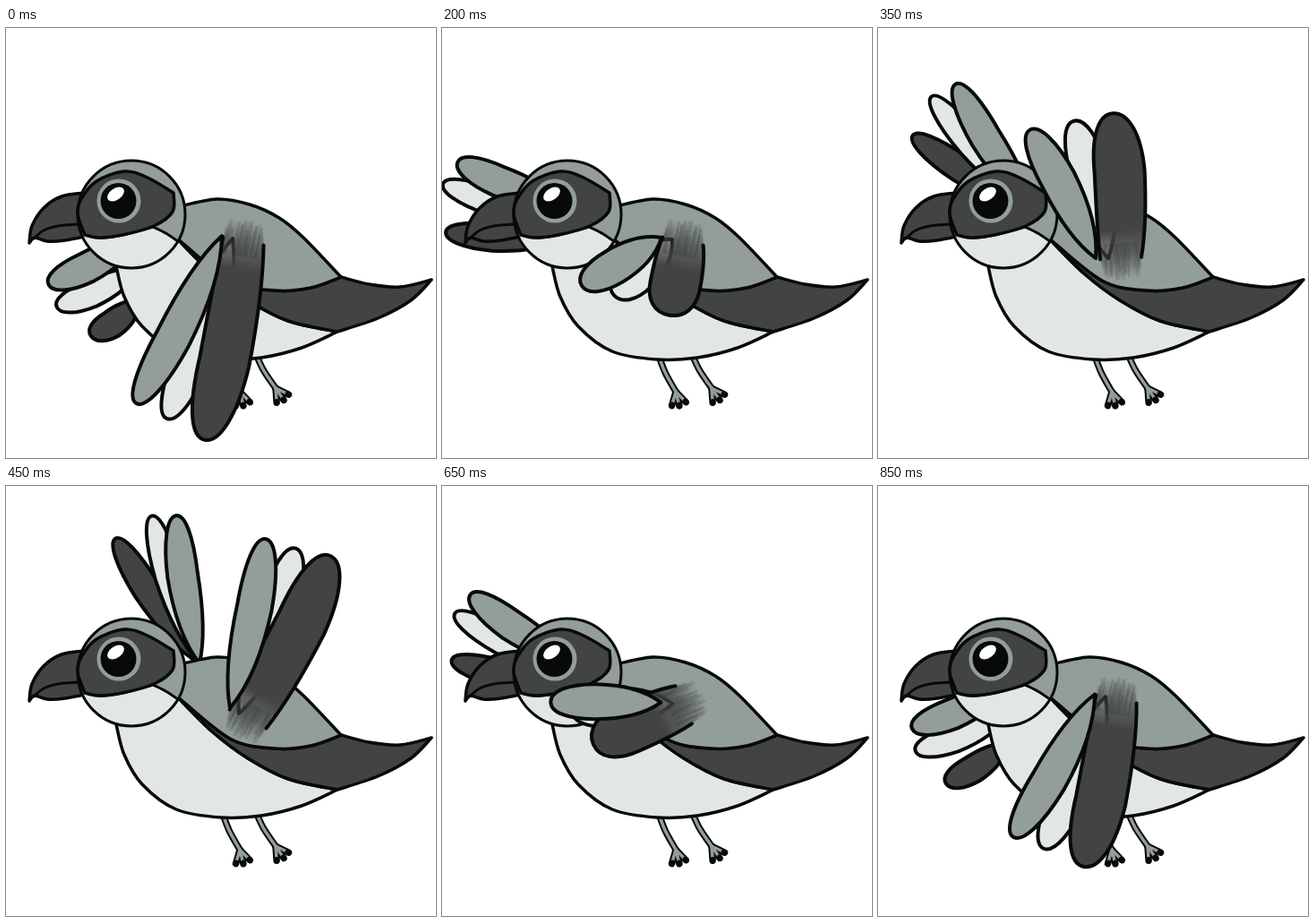
Write an HTML page with a canvas that moves like this. It is 480 by 480 pixels and loops after 900 ms.

```html
<!DOCTYPE html>
<html lang="en">
<head>
<meta charset="utf-8">
<title>Flapping bird</title>
<style>
html, body { margin: 0; width: 100%; height: 100%; overflow: hidden; background: #fff; }
canvas { display: block; width: 480px; height: 480px; }
</style>
</head>
<body>
<canvas id="stage" width="480" height="480"></canvas>
<script>
const ctx = document.getElementById('stage').getContext('2d');
const INK = '#070a09', GRAY = '#929d9c', DARK = '#424343', PALE = '#e2e7e6';
const STEP = 50, STEPS = 18, TOP = STEPS / 2;

// A wing swings through four poses: low, folded, raised, high.
const POSES = [0, 4, 7, TOP];

// root: first feather's x, y and the offset to the next feather's root.
// Each feather turns (degrees) and stretches (length) about its root.
const farWing = {
  root: [[150, 232, 0, 36], [135, 195, 0, 20], [176, 206, 0, 0], [216, 198, 0, 0]],
  bend: () => 0.2,
  feathers: [
    { fill: GRAY, half: 17, turn: [152, 201, 238, 261], length: [116, 126, 169, 167] },
    { fill: PALE, half: 15, turn: [155, 197, 228, 252], length: [103, 140, 174, 173] },
    { fill: DARK, half: 15, turn: [144, 183, 212, 236], length: [68, 131, 162, 168] }
  ],
  order: [2, 1, 0]
};
const nearWing = {
  root: [[241, 232, 12, 3], [245, 234, 12, 2], [243, 257, 14, 0], [250, 248, 10, 6]],
  bend: pose => 0.18 * Math.cos(Math.PI * pose / TOP),
  feathers: [
    { fill: GRAY, half: 19.5, turn: [117, 149, 243, 282], length: [210, 104, 161, 193] },
    { fill: PALE, half: 21, turn: [110, 136, 256, 289], length: [214, 90, 158, 195] },
    { fill: DARK, half: 28, turn: [101, 101, 267, 297], length: [226, 84, 162, 204], open: 23 }
  ],
  order: [1, 2, 0]
};

const BACK_TOP = [[190, 200], [235, 191], [272, 197], [305, 212], [332, 234], [374, 278]];
const BACK_LOW = [[374, 278], [340, 290], [300, 293], [250, 282], [190, 234]];
const TAIL_TOP = [[374, 278], [405, 286], [440, 289], [475, 281]];
const TAIL_LOW = [[475, 281], [452, 304], [415, 324], [370, 339]];
const STRIPE = [[370, 339], [315, 327], [270, 304], [230, 274], [190, 234]];
const BELLY = [[370, 339], [330, 357], [285, 368], [240, 370], [190, 361], [152, 333], [132, 300], [123, 266]];
const MASK_TOP = [[88, 231], [80, 208], [84, 191], [101, 171], [132, 160], [158, 167], [187, 184]];
const MASK_LOW = [[187, 184], [186, 205], [165, 221], [130, 231], [104, 234], [88, 231]];

const back = run => run.slice().reverse();
const mix = (a, b, t) => a + (b - a) * t;

// Smooth curves through points; corners only where two runs meet.
function trace(...runs) {
  ctx.beginPath();
  runs.forEach((r, k) => {
    ctx[k ? 'lineTo' : 'moveTo'](...r[0]);
    for (let i = 0; i < r.length - 1; i++) {
      const a = r[i - 1] || r[i], b = r[i], c = r[i + 1], d = r[i + 2] || c;
      ctx.bezierCurveTo(b[0] + (c[0] - a[0]) / 6, b[1] + (c[1] - a[1]) / 6,
        c[0] - (d[0] - b[0]) / 6, c[1] - (d[1] - b[1]) / 6, c[0], c[1]);
    }
  });
}

function paint(fill, width = 3.5) {
  if (fill) { ctx.fillStyle = fill; ctx.fill(); }
  if (width) { ctx.strokeStyle = INK; ctx.lineWidth = width; ctx.stroke(); }
}

function oval(x, y, rx, ry, turn, fill, width) {
  ctx.beginPath();
  ctx.ellipse(x, y, rx, ry, turn, 0, Math.PI * 2);
  paint(fill, width);
}

function random(seed) {
  return () => (seed = (seed * 16807) % 2147483647) / 2147483647;
}

// Local axes: u runs from root to tip in pixels, v across.
function feather(x, y, angle, len, half, bend, fill, open) {
  const base = open || 0, near = mix(base, half, 0.7);
  ctx.save();
  ctx.translate(x, y);
  ctx.rotate(angle * Math.PI / 180);
  const at = (t, v) => [t * len, v - bend * half * 4 * t * (1 - t)];
  const curve = (...p) => ctx.bezierCurveTo(...p.flatMap(q => at(...q)));
  const outline = () => {
    ctx.beginPath();
    ctx.moveTo(0, -base);
    curve([0.15, -near], [0.35, -half], [0.6, -half]);
    curve([0.85, -half], [1, -half * 0.6], [1, 0]);
    curve([1, half * 0.6], [0.85, half], [0.6, half]);
    curve([0.35, half], [0.15, near], [0, base]);
  };
  outline();
  if (open) {
    ctx.lineTo(-22, base * 0.8);
    ctx.lineTo(-22, -base * 0.8);
    paint(shoulderFade(fill), 0);
    hairs(base);
    outline();
    paint(null, 4);
  } else {
    ctx.closePath();
    paint(fill, 4);
  }
  ctx.restore();
}

function shoulderFade(fill) {
  const fade = ctx.createLinearGradient(-22, 0, 32, 0);
  fade.addColorStop(0, fill + '00');
  fade.addColorStop(0.5, fill + '99');
  fade.addColorStop(1, fill);
  return fade;
}

function hairs(spread) {
  const rnd = random(71);
  ctx.strokeStyle = DARK + '24';
  ctx.lineWidth = 2;
  for (let i = 0; i < 50; i++) {
    const v = (rnd() * 2 - 1) * spread * 0.9;
    ctx.beginPath();
    ctx.moveTo(16, v);
    ctx.lineTo(-rnd() * 24, v + rnd() * 6 - 3);
    ctx.stroke();
  }
}

function wing({ root, bend, feathers, order }, pose) {
  const i = POSES.findIndex((p, k) => k === POSES.length - 2 || pose < POSES[k + 1]);
  const t = (pose - POSES[i]) / (POSES[i + 1] - POSES[i]);
  const swing = i ? t : t ** 1.8; // slow start from the bottom
  const [x, y, dx, dy] = root[i].map((v, k) => mix(v, root[i + 1][k], t));
  for (const n of order) {
    const { fill, half, turn, length, open } = feathers[n];
    feather(x + dx * n, y + dy * n, mix(turn[i], turn[i + 1], swing),
      mix(length[i], length[i + 1], t), half, bend(pose), fill, open);
  }
}

function leg(x, y, footX, footY, aim) {
  const foot = [footX, footY];
  const toes = [-30, 0, 30].map(a => {
    const r = (aim + a) * Math.PI / 180;
    return [footX + 16 * Math.cos(r), footY + 16 * Math.sin(r), r];
  });
  const lines = [[[x, y], [mix(x, footX, 0.38), mix(y, footY, 0.47)], foot], ...toes.map(t => [foot, t])];
  for (const [color, width] of [[INK, 7.5], [GRAY, 3.5]]) {
    ctx.strokeStyle = color;
    ctx.lineWidth = width;
    for (const line of lines) { trace(line); ctx.stroke(); }
  }
  for (const [tx, ty, r] of toes) oval(tx, ty, 4, 2.8, r, INK, 0);
}

function body() {
  leg(242, 366, 261, 406, 76);
  leg(279, 364, 301, 402, 56);
  trace(back(STRIPE), BELLY);
  paint(PALE);
  trace(TAIL_TOP, TAIL_LOW, STRIPE, back(BACK_LOW));
  paint(DARK);
  trace(BACK_TOP, BACK_LOW);
  paint(GRAY);
}

function head() {
  trace([[88, 184], [62, 188], [42, 201], [29, 221], [26, 240]],
    [[26, 240], [32, 234], [46, 238], [66, 237], [92, 232]]);
  paint(DARK);
  trace([[31, 235], [42, 226], [58, 221], [82, 219]]);
  paint(null, 3);

  oval(140, 208, 60, 60, 0, GRAY, 0);
  ctx.save();
  ctx.clip();
  trace([[80, 225], [104, 234], [130, 231], [164, 222]],
    [[164, 222], [180, 230], [200, 244]], [[200, 275], [80, 275]]);
  paint(PALE, 3);
  ctx.restore();
  trace(MASK_TOP, MASK_LOW);
  paint(DARK);
  oval(140, 208, 60, 60, 0, null, 3);

  oval(126, 193, 24.5, 24.5, 0, GRAY, 0);
  oval(125.5, 193, 20, 20, 0, INK, 0);
  oval(122.5, 185.5, 10.5, 6.5, -0.6, '#fff', 0);
}

function draw(pose) {
  ctx.fillStyle = '#fff';
  ctx.fillRect(0, 0, 480, 480);
  wing(farWing, pose);
  body();
  head();
  wing(nearWing, pose);
}

ctx.lineCap = ctx.lineJoin = 'round';
const start = performance.now();
let shown = -1;

function tick() {
  const step = Math.floor((performance.now() - start) / STEP) % STEPS;
  if (step !== shown) {
    shown = step;
    draw(Math.min(step, STEPS - step)); // down strokes mirror up strokes
  }
  requestAnimationFrame(tick);
}
tick();
</script>
</body>
</html>
```
